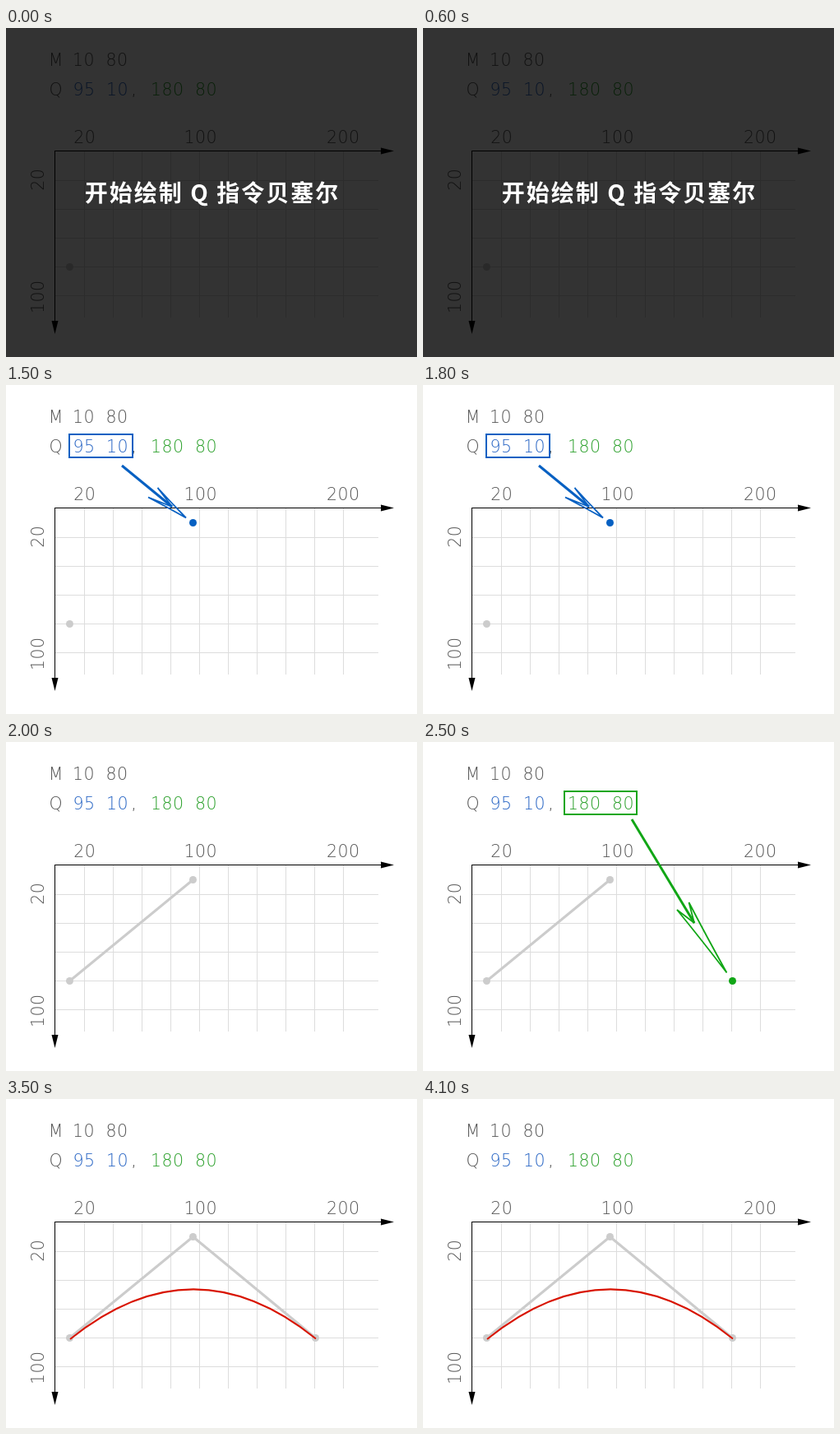
An HTML page with a canvas that plays this animation: 500 by 400 pixels, repeating every 4500 ms.

```html
<!DOCTYPE html>
<html lang="zh-CN">
<head>
<meta charset="utf-8">
<title>Q 指令贝塞尔</title>
<style>
html, body { margin: 0; width: 100%; height: 100%; overflow: hidden; background: #fff; }
canvas { display: block; }
</style>
</head>
<body>
<canvas id="stage" width="500" height="400"></canvas>
<script>
const ctx = document.getElementById('stage').getContext('2d');
const LOOP = 4500;
const PITCH = 13.5;
const GREY = '#ccc', BLUE = '#0660c2', GREEN = '#11a616', RED = '#d81400', INK = '#555';
const START = [77.5, 290.5], CONTROL = [227.5, 167.5], END = [376.5, 290.5];

function line(points, color, width) {
  ctx.beginPath();
  points.forEach(p => ctx.lineTo(...p));
  ctx.strokeStyle = color;
  ctx.lineWidth = width;
  ctx.stroke();
}

function triangle(points) {
  ctx.beginPath();
  points.forEach(p => ctx.lineTo(...p));
  ctx.fillStyle = '#000';
  ctx.fill();
}

function dot([x, y], color) {
  ctx.beginPath();
  ctx.arc(x, y, 4.5, 0, Math.PI * 2);
  ctx.fillStyle = color;
  ctx.fill();
}

// Evenly spaced characters; x is the centre of the first one.
function mono(text, x, y, color = INK) {
  ctx.font = '200 20.5px "DejaVu Sans", sans-serif';
  ctx.textAlign = 'center';
  ctx.fillStyle = color;
  [...text].forEach((ch, i) => ctx.fillText(ch, x + i * PITCH, y));
}

function label(text, x, y, angle = 0) {
  ctx.save();
  ctx.translate(x, y);
  ctx.rotate(angle);
  mono(text, -(text.length - 1) * PITCH / 2, 0);
  ctx.restore();
}

function drawChart() {
  ctx.fillStyle = '#fff';
  ctx.fillRect(0, 0, 500, 400);

  mono('M 10 80', 60.5, 46);
  mono('Q', 60.5, 82);
  mono('95 10', 88, 82, '#2865c4');
  mono(',', 155.5, 82, '#333');
  mono('180 80', 182.5, 82, '#2ba02b');

  for (let x = 95.5; x < 420; x += 35) line([[x, 150], [x, 352]], '#ddd', 1);
  for (let y = 185.5; y < 340; y += 35) line([[60, y], [453, y]], '#ddd', 1);

  line([[59, 149.5], [458, 149.5]], '#000', 1);
  line([[59.5, 149], [59.5, 358]], '#000', 1);
  triangle([[456, 145.5], [472, 149.5], [456, 153.5]]);
  triangle([[55.5, 356], [59.5, 372], [63.5, 356]]);

  label('20', 95.5, 140);
  label('100', 236.5, 140);
  label('200', 410, 140);
  label('20', 46, 184.5, -Math.PI / 2);
  label('100', 46, 327, -Math.PI / 2);
}

// Shaft plus a hollow dart head with slightly bowed sides.
function arrow(from, notch, left, right, tip, color) {
  const bow = p => p.map((v, i) => (v + tip[i]) / 2 + (notch[i] - (v + tip[i]) / 2) * 0.12);
  line([from, notch], color, 3);
  ctx.beginPath();
  ctx.moveTo(...notch);
  ctx.lineTo(...left);
  ctx.quadraticCurveTo(...bow(left), ...tip);
  ctx.quadraticCurveTo(...bow(right), ...right);
  ctx.closePath();
  ctx.lineWidth = 1.8;
  ctx.lineJoin = 'bevel';
  ctx.stroke();
  ctx.lineJoin = 'miter';
}

function box(x, y, w, h, color) {
  ctx.strokeStyle = color;
  ctx.lineWidth = 2;
  ctx.strokeRect(x, y, w, h);
}

function drawTitle() {
  ctx.fillStyle = 'rgba(0, 0, 0, 0.8)';
  ctx.fillRect(0, 0, 500, 400);
  ctx.font = '700 28px "Noto Sans CJK SC", "Noto Sans CJK", sans-serif';
  ctx.letterSpacing = '2px';
  ctx.textAlign = 'center';
  ctx.fillStyle = '#fff';
  ctx.fillText('开始绘制 Q 指令贝塞尔', 251, 211);
  ctx.letterSpacing = '0px';
}

function draw(t) {
  drawChart();
  if (t >= 2000) line([START, CONTROL], GREY, 3);
  if (t >= 3000) line([CONTROL, END], GREY, 3);
  dot(START, GREY);
  if (t >= 1500) dot(CONTROL, t < 2000 ? BLUE : GREY);
  if (t >= 2500) dot(END, t < 3000 ? GREEN : GREY);

  if (t >= 1500 && t < 2000) {
    box(77, 60, 77, 28, BLUE);
    arrow([141, 98], [202, 148], [173, 136.5], [184.5, 125], [219, 161.5], BLUE);
  }
  if (t >= 2500 && t < 3000) {
    box(172, 60, 88, 28, GREEN);
    arrow([254, 94], [330, 220], [309, 204], [323.5, 195], [369.5, 280.5], GREEN);
  }
  if (t >= 3500) {
    ctx.beginPath();
    ctx.moveTo(78, 292);
    ctx.quadraticCurveTo(228, 171, 377, 291.5);
    ctx.strokeStyle = RED;
    ctx.lineWidth = 2;
    ctx.stroke();
  }
  if (t < 1000) drawTitle();
}

const begin = performance.now();
function tick() {
  draw((performance.now() - begin) % LOOP);
  requestAnimationFrame(tick);
}
tick();
</script>
</body>
</html>
```
